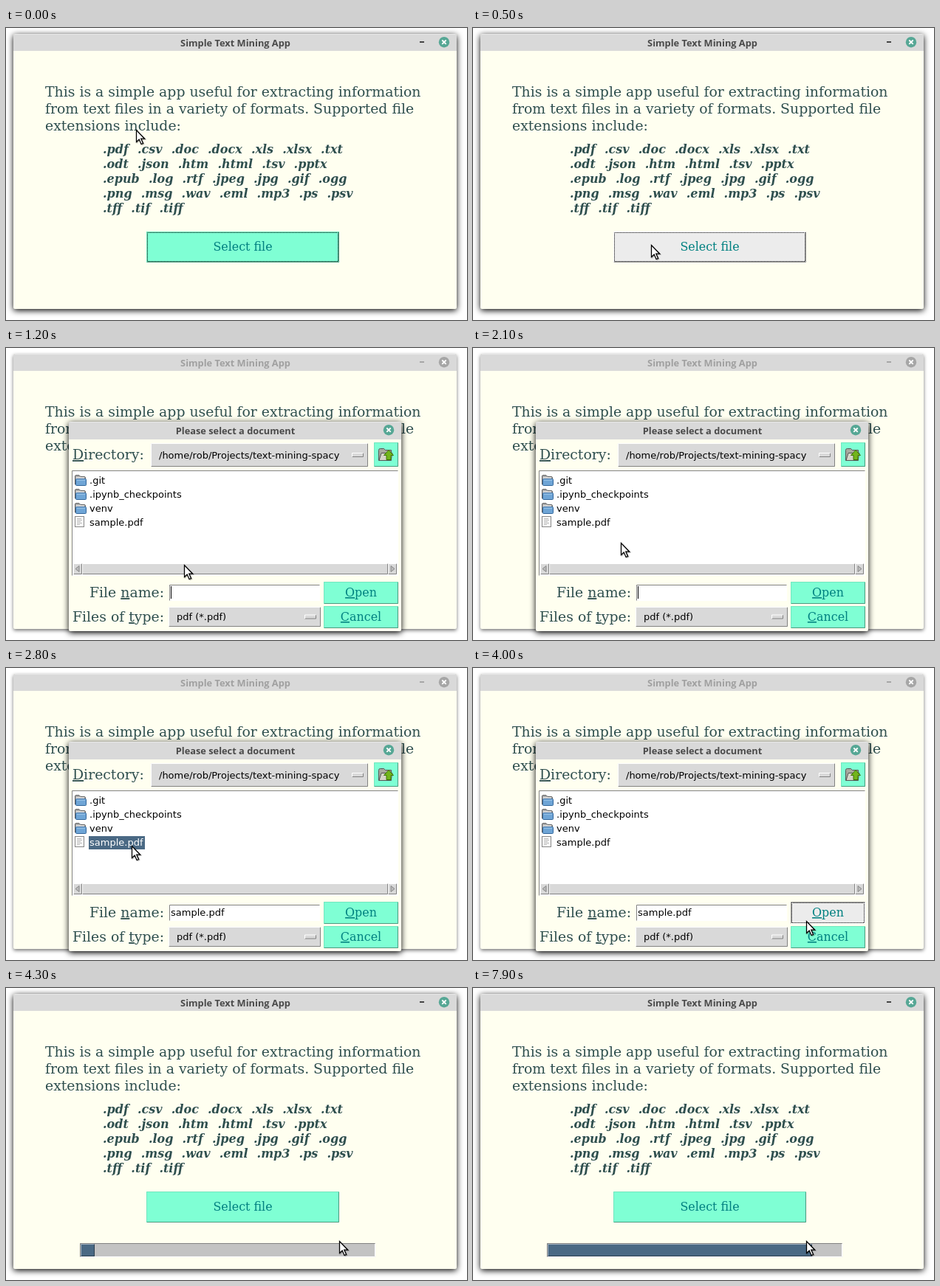
Animation of 624 by 396 pixels, one loop 8 s. Source, as an HTML page:

```html
<!DOCTYPE html>
<html lang="en">
<head>
<meta charset="utf-8">
<title>Simple Text Mining App</title>
<style>
  html, body { margin: 0; width: 100%; height: 100%; overflow: hidden; background: #fff; }
  svg { display: block; }
  text { white-space: pre; }
  .title { font: bold 12.8px "Open Sans", sans-serif; text-anchor: middle; }
  .label { font: 18.85px "DejaVu Serif", serif; fill: #2f4f4f; }
  .types { font: italic bold 16px "DejaVu Serif", serif; word-spacing: .5px; fill: #2f4f4f; }
  .button { font: 15.9px "DejaVu Serif", serif; fill: #008080; text-anchor: middle; }
  .field { font: 13px "DejaVu Sans", sans-serif; fill: #000; }
  .key { text-decoration: underline; }
</style>
</head>
<body>
<svg id="stage" width="624" height="396" viewBox="0 0 624 396"></svg>
<script>
const LOOP = 8000, TICK = 100;
const IVORY = '#fffff0', AQUA = '#7fffd4', GREY = '#d9d9d9', HOVER = '#ececec';
const TROUGH = '#c3c3c3', BLUE = '#4a6984';

// Pointer stops: time, x, y
const STOPS = [
  [100, 176, 138], [500, 241, 294], [1700, 241, 294], [2400, 170, 241], [3000, 170, 241],
  [3300, 365, 288], [3500, 365, 288], [3700, 438, 348], [3800, 451, 343],
];

const INTRO = [
  'This is a simple app useful for extracting information',
  'from text files in a variety of formats. Supported file',
  'extensions include:',
];
const TYPES = [
  '.pdf  .csv  .doc  .docx  .xls  .xlsx  .txt',
  '.odt  .json  .htm  .html  .tsv  .pptx',
  '.epub  .log  .rtf  .jpeg  .jpg  .gif  .ogg',
  '.png  .msg  .wav  .eml  .mp3  .ps  .psv',
  '.tff  .tif  .tiff',
];
const FOLDERS = ['.git', '.ipynb_checkpoints', 'venv'];

const text = (style, x, y, content, extra = '') =>
  `<text class="${style}" x="${x}" y="${y}" ${extra}>${content}</text>`;
const rect = (x, y, w, h, fill, extra = '') =>
  `<rect x="${x}" y="${y}" width="${w}" height="${h}" fill="${fill}" ${extra}/>`;
const path = (d, stroke, fill = 'none', extra = '') =>
  `<path d="${d}" stroke="${stroke}" fill="${fill}" ${extra}/>`;
// "&" marks the underlined shortcut letter
const shortcut = label => label.replace(/&(.)/, '<tspan class="key">$1</tspan>');

// Light and dark border shades of a base colour; very bright bases get a darker "light" side
function shades(base) {
  const rgb = base.match(/\w\w/g).map(part => parseInt(part, 16));
  const light = c => rgb[1] > 242 ? c * .9 : Math.min(255, Math.max(c * 1.4, (255 + c) / 2));
  return [light, c => c * .6].map(shade => `rgb(${rgb.map(c => Math.round(shade(c)))})`);
}

function bevel(x, y, w, h, fill, { base = fill, sunken = false } = {}) {
  const [light, dark] = shades(base);
  const start = `M${x + .5} ${y + h - .5}`;
  return rect(x, y, w, h, fill) +
    path(`${start}h${w - 1}v${1 - h}`, sunken ? light : dark) +
    path(`${start}v${1 - h}h${w - 1}`, sunken ? dark : light);
}

const well = (x, y, w, h, fill) => bevel(x, y, w, h, fill, { base: GREY, sunken: true });

function button(x, y, w, h, label, { hover, pressed, focus } = {}) {
  const ring = 'stroke="#000" stroke-dasharray="1" stroke-dashoffset=".5"';
  return bevel(x, y, w, h, hover ? HOVER : AQUA, { sunken: pressed }) +
    (focus ? rect(x + 1.5, y + 1.5, w - 3, h - 3, 'none', ring) : '') +
    text('button', x + w / 2, y + h / 2 + 5, shortcut(label));
}

function menu(x, y, w, h, label) {
  return bevel(x, y, w, h, GREY) +
    text('field', x + 11, y + h / 2 + 4.5, label) +
    bevel(x + w - 22, y + h / 2 - 3, 16, 6, GREY);
}

function frame(x, y, w, h, title, barHeight, active) {
  const shadow = active ? '0 2px 4.5px #000' : '0 2px 2.5px rgba(0,0,0,.55)';
  const ink = active ? '#4a4a4a' : '#a0a0a0';
  const cx = x + w - 17, cy = y + 11.2;
  return rect(x, y, w, h, IVORY, `rx="2" style="filter:drop-shadow(${shadow})"`) +
    path(`M${x} ${y + barHeight}v${2 - barHeight}q0 -2 2 -2h${w - 4}q2 0 2 2v${barHeight - 2}z`, 'none', GREY) +
    path(`M${x + 2} ${y + .5}h${w - 4}`, '#e8e8e8') +
    text('title', x + w / 2 + .5, y + 17, title, `fill="${ink}"`) +
    `<circle cx="${cx}" cy="${cy}" r="7.2" fill="${active ? '#56a795' : '#a6a6a6'}"/>` +
    path(`M${cx - 2.7} ${cy - 2.7}l5.4 5.4m0 -5.4l-5.4 5.4`, '#fff', 'none', 'stroke-width="1.8"');
}

function folder(x, y) {
  return path(`M${x + .5} ${y + 13}v-11q0 -1.5 1.5 -1.5h4l2 2h5q1.5 0 1.5 1.5v9z`, '#666', '#aaa') +
    rect(x + 2, y + 3.5, 11, 3, '#eee') +
    rect(x + 1.5, y + 5.5, 14, 9, '#6fa5d6', 'rx="1" stroke="#33669a"') +
    path(`M${x + 3} ${y + 7}h11`, '#a5cbeb');
}

function parentFolder(x, y) {
  return path(`M${x + .5} ${y + 16.5}v-14q0 -2 2 -2h5l2 2h8v14z`, '#555', '#a9a99f') +
    path(`M${x + 1} ${y + 16.5}l3 -10h15l-2 10z`, '#555', '#d5d5c8') +
    path(`M${x + 14} ${y + 2.5}l6.5 7h-3.5v6h-6v-6h-3.5z`, '#3c7800', '#73b51c');
}

function sheet(x, y) {
  return rect(x + .5, y + .5, 12, 14, '#f7f7f7', 'stroke="#888"') +
    path(`M${x + 3} ${y + 3.5}h6m-6 2h7m-7 2h5m-5 2h7m-7 2h4`, '#bbb');
}

function scrollbar(x, y, w, h) {
  const middle = y + h / 2;
  return rect(x, y, w, h, TROUGH) +
    bevel(x, y, 12, h, GREY) + bevel(x + 12, y, w - 24, h, GREY) + bevel(x + w - 12, y, 12, h, GREY) +
    path(`M${x + 8} ${middle - 4}l-5 4l5 4z`, '#888', '#bbb') +
    path(`M${x + w - 8} ${middle - 4}l5 4l-5 4z`, '#888', '#bbb');
}

function mainWindow(t) {
  const active = t < 1200 || t >= 4300;
  const state = { hover: t >= 500 && t < 1100, pressed: t >= 800 && t < 1000, focus: t < 1100 };
  let out = frame(10, 8, 600, 373, 'Simple Text Mining App', 23, active) +
    rect(560, 18, 6, 2, active ? '#444' : '#a6a6a6');
  INTRO.forEach((line, i) => out += text('label', 53, 93 + 23 * i, line));
  TYPES.forEach((line, i) => out += text('types', 131, 170 + 20 * i, line));
  out += button(190, 276, 261, 42, 'Select file', state);
  if (t >= 1000) {
    out += well(100, 346, 400, 19, TROUGH) + bevel(101, 347, t >= 7900 ? 358 : 19, 17, BLUE);
  }
  return out;
}

function fileDialog(t) {
  const chosen = t >= 2800, selected = chosen && t < 4000;
  const caret = t < 1700 || t >= 2000 && t < 2600;
  const open = { hover: t >= 3800, pressed: t >= 4000, focus: t >= 4000 };
  let out = frame(85, 100, 450, 284, 'Please select a document', 24, true) +
    text('label', 90, 151, shortcut('&Directory:')) +
    menu(196, 129, 294, 32, '/home/rob/Projects/text-mining-spacy') +
    button(498, 128, 33, 33, '') + parentFolder(504, 136) +
    well(89, 166, 442, 143, '#fff') + scrollbar(91, 292, 438, 15);
  FOLDERS.forEach((name, i) => out += folder(93, 172 + 19 * i) + text('field', 113, 184 + 19 * i, name));
  out += sheet(93, 228) + (selected ? rect(112, 228, 76, 18, BLUE) : '') +
    text('field', 113, 241, 'sample.pdf', selected ? 'style="fill:#fff"' : '') +
    text('label', 214, 338, shortcut('File &name:'), 'text-anchor="end"') +
    text('label', 214, 371, shortcut('Files of &type:'), 'text-anchor="end"') +
    well(221, 321, 204, 22, '#fff') +
    menu(220, 351, 206, 27, 'pdf (*.pdf)') +
    button(430, 317, 101, 30, '&Open', open) +
    button(430, 350, 101, 30, '&Cancel');
  if (chosen) out += text('field', 223, 336, 'sample.pdf');
  else if (caret) out += rect(223, 323, 1, 17, '#000');
  return out;
}

function pointer(t) {
  const next = STOPS.findIndex(stop => stop[0] > t);
  const [t1, x1, y1] = next < 0 ? STOPS.at(-1) : STOPS[next];
  const [t0, x0, y0] = next < 0 ? [t1, x1, y1] : STOPS[Math.max(next - 1, 0)];
  const k = t1 > t0 ? (t - t0) / (t1 - t0) : 0;
  const x = Math.round(x0 + (x1 - x0) * k), y = Math.round(y0 + (y1 - y0) * k);
  return path('M.5 .5v16l3.7 -3.4l2.8 6.4l2.6 -1.1l-2.8 -6.2h4.9z', '#000', '#fff',
    `stroke-width="1.3" transform="translate(${x} ${y})" style="filter:drop-shadow(1px 1px .6px rgba(0,0,0,.3))"`);
}

const stage = document.getElementById('stage');
let shown = -1;

function draw() {
  const t = Math.floor(performance.now() % LOOP / TICK) * TICK;
  if (t !== shown) {
    shown = t;
    stage.innerHTML = mainWindow(t) + (t >= 1200 && t < 4200 ? fileDialog(t) : '') + pointer(t);
  }
  requestAnimationFrame(draw);
}
draw();
</script>
</body>
</html>
```
